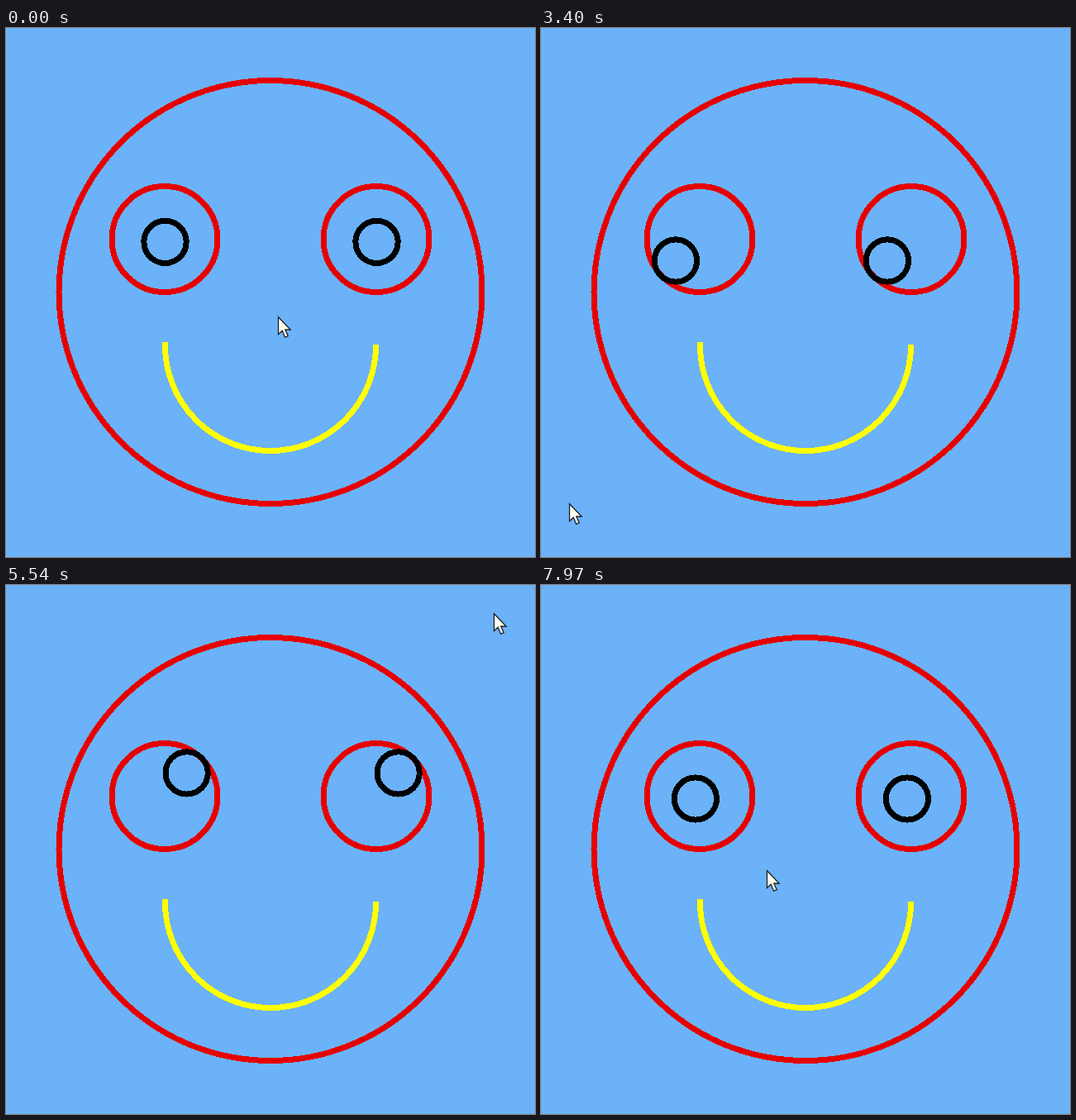
Recreate the animation shown at these times as an HTML page. Size 640 px wide and 640 px high, loop 8 s.

```html
<!DOCTYPE html>
<html lang="en">
<head>
<meta charset="utf-8">
<title>Watching face</title>
<style>
  html, body { margin: 0; width: 100%; height: 100%; overflow: hidden; background: #6bb2f8; }
  svg { display: block; width: 100%; height: 100%; }
</style>
</head>
<body>
<svg viewBox="0 0 640 640" fill="none" stroke-width="7">
  <g shape-rendering="crispEdges">
    <g stroke="#e60000">
      <circle cx="320" cy="319.5" r="256"/>
      <circle cx="192" cy="255.5" r="64"/>
      <circle cx="448" cy="255.5" r="64"/>
    </g>
    <path stroke="#ff0" d="M192.5 380V384A127.5 127.5 0 0 0 447.5 384V383"/>
    <g id="pupils" stroke="#000">
      <circle cx="192" cy="256" r="25.6"/>
      <circle cx="448" cy="256" r="25.6"/>
    </g>
  </g>
  <path id="cursor" d="M.5 .7V21.5L5.2 17.2 8.6 25.2 12.2 23.7 8.8 16H15.2Z"
        fill="#fffdf2" stroke="#1c2024" stroke-width="1.3"/>
</svg>
<script>
const LOOP = 8000, MID = 320;

// The pointer rests, then circles the stage clockwise on a rounded square.
// Each key: time, angle in degrees, half-width of the square
const keys = [
  [1650, 72.8, 29], [2450, 41.6, 281], [2670, 53.7, 280.8], [4130, 217.7, 312.6],
  [5540, 313.4, 304], [7040, 410.6, 277.5], [7500, 445, 280], [7970, 512, 47]
];
const last = keys.length - 1;

const pupils = document.getElementById('pupils');
const cursor = document.getElementById('cursor');

function slope(i, n) {
  if (i === 0) return 0;
  const a = keys[i - 1], b = keys[Math.min(i + 1, last)];
  return (b[n] - a[n]) / (b[0] - a[0]);
}

// Cubic Hermite interpolation of column n
function track(t, n) {
  let i = 0;
  while (i < last - 1 && t >= keys[i + 1][0]) i++;
  const a = keys[i], b = keys[i + 1], span = b[0] - a[0];
  const u = Math.min(1, Math.max(0, (t - a[0]) / span)), v = 1 - u;
  return v * v * (1 + 2 * u) * a[n] + u * u * (3 - 2 * u) * b[n] +
    span * u * v * (v * slope(i, n) - u * slope(i + 1, n));
}

function pointer(t) {
  const angle = track(t, 1) * Math.PI / 180;
  const c = Math.cos(angle), s = Math.sin(angle);
  const r = track(t, 2) / (c ** 8 + s ** 8) ** (1 / 8);
  return [MID + r * c, MID + r * s];
}

const move = (el, x, y) => el.setAttribute('transform', `translate(${x} ${y})`);

function render(t) {
  const [x, y] = pointer(t);
  move(cursor, Math.round(x), Math.round(y));
  move(pupils, (x - MID - 4) / 10, (y - MID) / 10);
}

let start;
function tick(now) {
  start ??= now;
  render((now - start) % LOOP);
  requestAnimationFrame(tick);
}
render(0);
requestAnimationFrame(tick);
</script>
</body>
</html>
```
